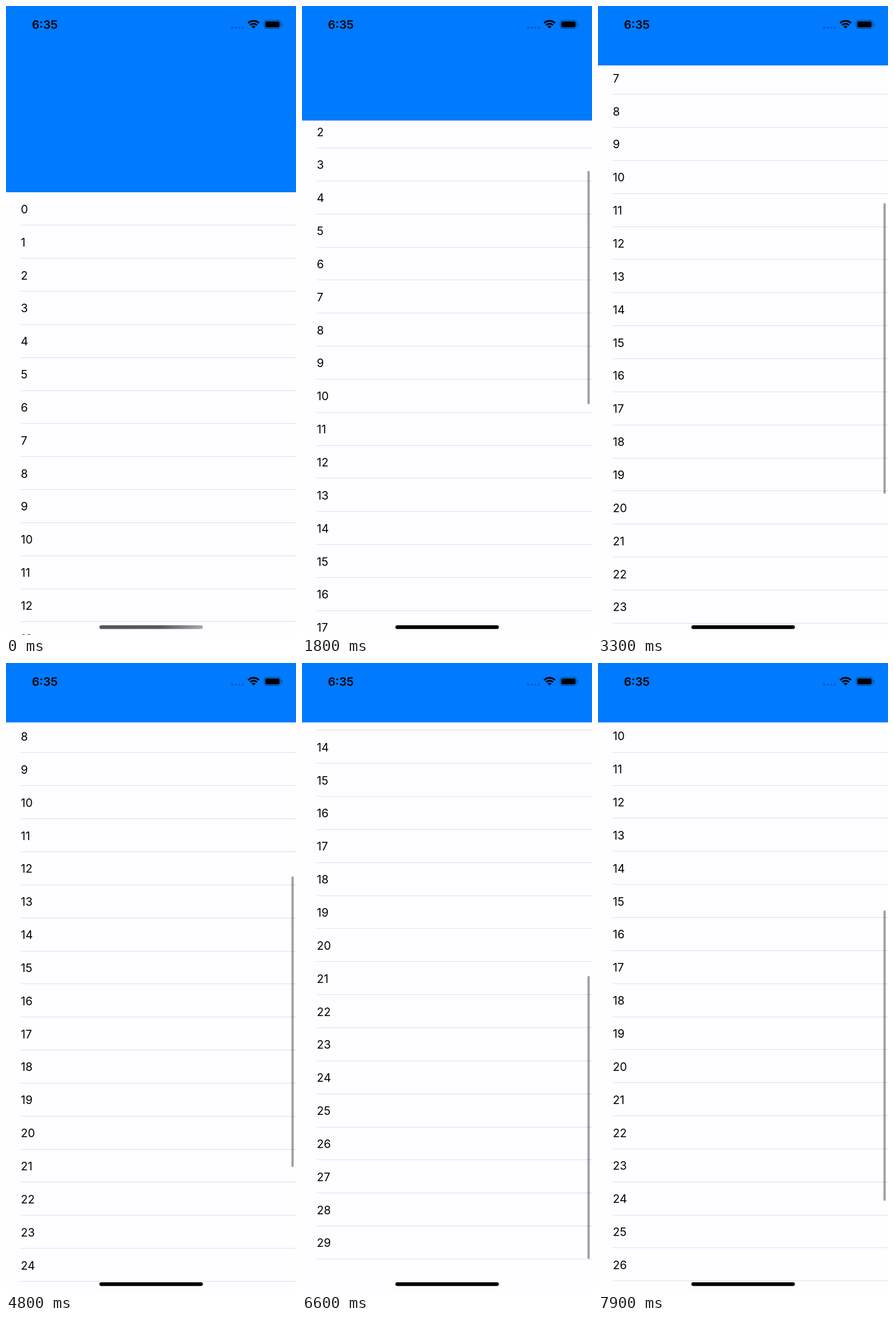
Write an HTML page with a canvas that moves like this. It is 509x1101 px and loops after 8 s.

```html
<!DOCTYPE html>
<html lang="en">
<head>
<meta charset="utf-8">
<title>Collapsing header list</title>
<style>
  html, body { margin: 0; width: 100%; height: 100%; overflow: hidden; background: #fefdff; }
  canvas { display: block; width: 509px; height: 1101px; }
</style>
</head>
<body>
<canvas id="stage"></canvas>
<script>
const W = 509, H = 1101, LOOP = 8000, STEP = 100;
const ROWS = 30, ROW_H = 57.85, INSET = 26;
const HEADER_MAX = 326, HEADER_MIN = 104, SAFE_BOTTOM = 1057;
const CONTENT_H = ROWS * ROW_H;

// Scroll offset over time: [ms, px]
const KEYS = [
  [0, 0], [400, 0], [900, 30], [1000, 30], [1800, 125.5], [2700, 284], [3300, 412],
  [3500, 424], [4700, 424], [5000, 640], [5300, 776], [5600, 782.5], [6300, 782.5],
  [6600, 796], [7000, 782.5], [7300, 782.5], [7600, 710], [7900, 584], [8000, 540]
];

const canvas = document.getElementById('stage');
const ctx = canvas.getContext('2d');
const ratio = window.devicePixelRatio || 1;
canvas.width = W * ratio;
canvas.height = H * ratio;
ctx.scale(ratio, ratio);

const slope = i => (KEYS[i + 1][1] - KEYS[i][1]) / (KEYS[i + 1][0] - KEYS[i][0]);

// Harmonic mean of neighbouring slopes keeps the curve free of overshoot.
function tangent(i) {
  if (i === 0 || i === KEYS.length - 1) return 0;
  const a = slope(i - 1), b = slope(i);
  return a * b > 0 ? 2 * a * b / (a + b) : 0;
}

function scrollAt(t) {
  let i = 0;
  while (i < KEYS.length - 2 && t >= KEYS[i + 1][0]) i++;
  const [t0, y0] = KEYS[i], [t1, y1] = KEYS[i + 1];
  const d = t1 - t0, u = (t - t0) / d, v = 1 - u;
  return v * v * (1 + 2 * u) * y0 + u * u * (3 - 2 * u) * y1
    + d * u * v * (v * tangent(i) - u * tangent(i + 1));
}

function pill(x, y, w, h, r, fill) {
  ctx.beginPath();
  ctx.roundRect(x, y, w, h, r);
  ctx.fillStyle = fill;
  ctx.fill();
}

function drawRows(top) {
  ctx.font = '400 20px Inter, sans-serif';
  for (let i = 0; i < ROWS; i++) {
    const y = top + i * ROW_H;
    if (y > H || y + ROW_H < 0) continue;
    ctx.fillStyle = '#000';
    ctx.fillText(i, INSET, y + 36.8);
    ctx.fillStyle = '#dfdee2';
    ctx.fillRect(INSET, Math.round(y + ROW_H - 0.6), W - INSET, 1);
  }
}

function drawScrollbar(offset, header) {
  const visible = SAFE_BOTTOM - header;
  const start = header + 30.5, end = 1043, track = end - start;
  const length = track * visible / 1702;
  const limit = CONTENT_H - visible;
  const over = Math.max(0, offset - limit);
  const top = start + (track - length) * Math.min(1, offset / limit) + over;
  pill(501, top, 4, length - over, 2, 'rgba(0,0,0,0.36)');
}

function drawWifi() {
  const x = 434.5, y = 39.5, from = Math.PI * 1.25, to = Math.PI * 1.75;
  ctx.strokeStyle = ctx.fillStyle = '#000';
  ctx.lineWidth = 3;
  for (const r of [8.6, 13.6]) {
    ctx.beginPath();
    ctx.arc(x, y, r, from, to);
    ctx.stroke();
  }
  ctx.beginPath();
  ctx.moveTo(x, y);
  ctx.arc(x, y, 5, from, to);
  ctx.fill();
}

function drawBattery() {
  ctx.beginPath();
  ctx.roundRect(453.2, 25.2, 28.8, 14.2, 4);
  ctx.strokeStyle = 'rgba(0,0,0,0.4)';
  ctx.lineWidth = 1.2;
  ctx.stroke();
  pill(455, 27, 25.2, 10.6, 2.5, '#000');
  pill(483.3, 30, 1.8, 4.8, [0, 2, 2, 0], 'rgba(0,0,0,0.4)');
}

function drawStatus() {
  ctx.fillStyle = '#000';
  ctx.font = '600 20.5px Inter, sans-serif';
  ctx.fillText('6:35', 45.5, 40);
  for (let i = 0; i < 4; i++) pill(394.7 + i * 6.2, 35.8, 4.2, 4.2, 2.1, 'rgba(0,0,0,0.2)');
  drawWifi();
  drawBattery();
}

function drawHomeBar(t) {
  let fill = '#000';
  if (t < 500) {
    fill = ctx.createLinearGradient(164, 0, 345.5, 0);
    fill.addColorStop(0, '#56535a');
    fill.addColorStop(0.6, '#5b585f');
    fill.addColorStop(1, '#aaa8ae');
  }
  pill(164, 1084, 181.5, 6.6, 3.3, fill);
}

function render(t) {
  const offset = scrollAt(t);
  const header = Math.max(HEADER_MIN, HEADER_MAX - offset);
  ctx.fillStyle = '#fefdff';
  ctx.fillRect(0, 0, W, H);
  drawRows(header - offset);
  if ((t >= 500 && t < 3900) || t >= 4800) drawScrollbar(offset, header);
  ctx.fillStyle = '#007aff';
  ctx.fillRect(0, 0, W, header);
  drawStatus();
  drawHomeBar(t);
}

const begin = performance.now();
function tick() {
  const t = (performance.now() - begin) % LOOP;
  render(Math.floor(t / STEP) * STEP);
  requestAnimationFrame(tick);
}
tick();
</script>
</body>
</html>
```
